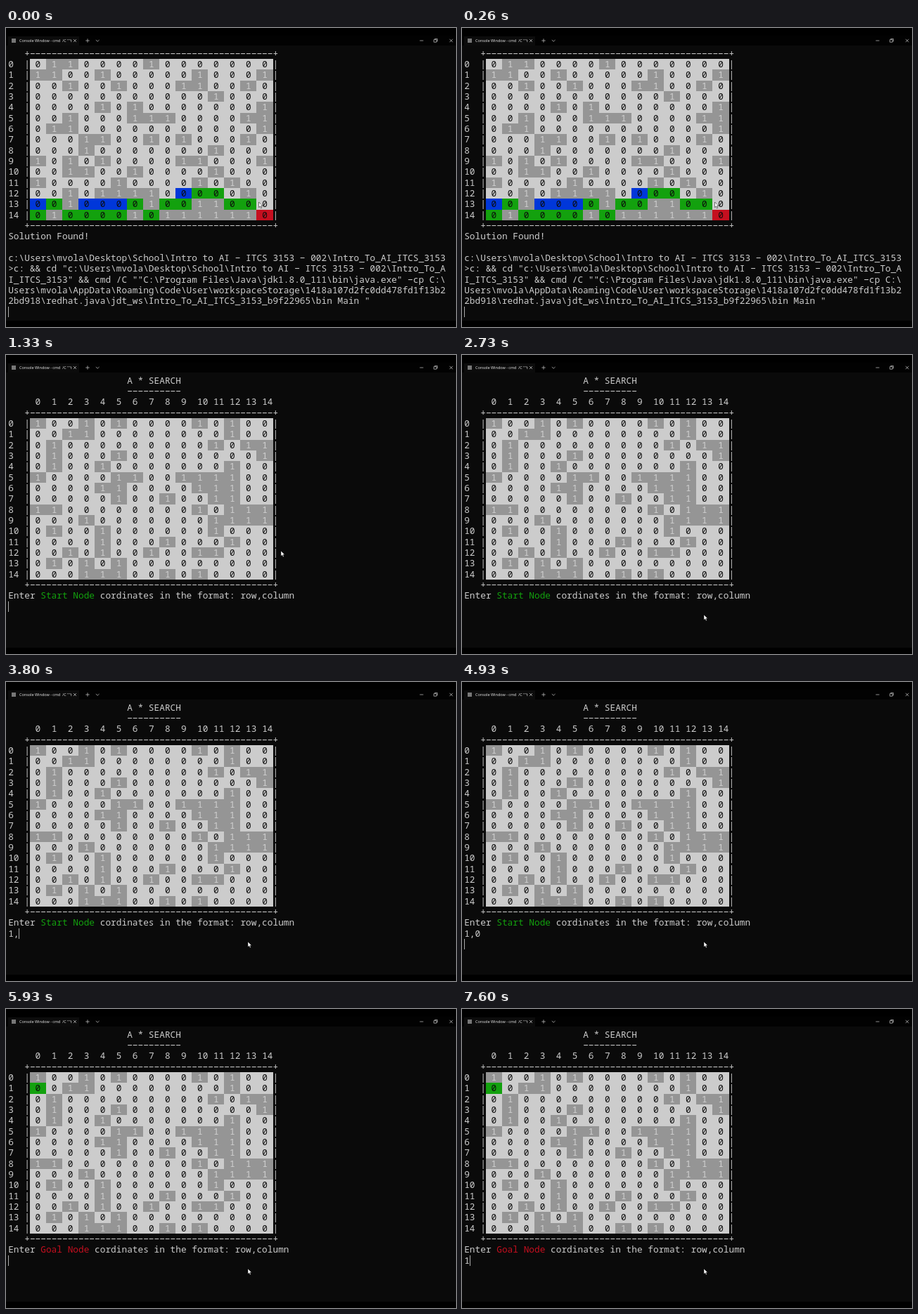
Write an HTML page that moves like this. It is 640 by 426 pixels and loops after 8 s.

```html
<!DOCTYPE html>
<html lang="en">
<head>
<meta charset="utf-8">
<title>Grid search in a terminal</title>
<style>
  html, body { margin: 0; width: 100%; height: 100%; overflow: hidden; background: #000; }
  svg { display: block; width: 640px; height: 426px; }
  text { white-space: pre; }
  .term { font: 12.8px "Noto Sans Mono", "DejaVu Sans Mono", monospace; fill: #ccc; }
  .tab { font: 5.5px "Open Sans", "Noto Sans", sans-serif; fill: #eee; }
  .icons { fill: none; stroke: #ccc; stroke-width: .7; }
</style>
</head>
<body>
<svg id="stage" viewBox="0 0 640 426" xmlns="http://www.w3.org/2000/svg">
  <rect width="640" height="426" fill="#000"/>
  <rect y="11" width="640" height="406" fill="#0a0a0a"/>
  <rect y="11" width="640" height="14" fill="#020202"/>
  <rect x="3" y="12" width="101" height="13" fill="#0c0c0c"/>
  <rect x="8" y="15" width="6" height="6" fill="#777"/>
  <text class="tab" x="19" y="20">Console Window - cmd  /C ""t</text>
  <g class="icons">
    <path d="M96 16l4 4m0-4l-4 4"/>
    <path d="M113.3 18h5.4M116 15.3v5.4"/>
    <path d="M127.8 17l2.4 2.2 2.4-2.2"/>
    <path d="M588.5 18h5"/>
    <path d="M608.6 16.6h3.6v3.6h-3.6zM609.8 16.4v-1h3.6v3.6h-1"/>
    <path d="M631 15.8l4.4 4.4m0-4.4l-4.4 4.4"/>
  </g>
  <g id="term" class="term"></g>
  <rect id="caret" width="1" height="15" fill="#aaa"/>
  <path id="mouse" d="M0 0V7.6L1.8 6 3 8.8 4.3 8.2 3.1 5.5H5.5Z" fill="#fff" stroke="#000" stroke-width=".5"/>
</svg>
<script>
const NS = 'http://www.w3.org/2000/svg';
const LOOP = 8000, SIZE = 15;
const CHAR = 7.68, LINE = 15.33, LEFT = 3.2, TOP = 28.7;
const GREEN = '#13a10e', RED = '#c50f1f', BLUE = '#0037da', INK = '#0c0c0c';
const $ = id => document.getElementById(id);
const colX = c => LEFT + c * CHAR;
const rowY = r => TOP + r * LINE;

function add(parent, tag, attrs = {}, text = '') {
  const el = document.createElementNS(NS, tag);
  for (const k in attrs) el.setAttribute(k, attrs[k]);
  el.textContent = text;
  return parent.appendChild(el);
}

// The terminal face draws its hyphens wide, like a minus sign.
const wide = s => s.replace(/-/g, '\u2212');

function print(parent, col, row, text, fill = '#ccc') {
  return add(parent, 'text', { x: colX(col), y: rowY(row) + 12.05, fill }, wide(text));
}

function block(parent, row, col, h, w, fill) {
  const x = Math.round(colX(4 + col * 3)), y = Math.round(rowY(row));
  const right = Math.round(colX(4 + (col + w) * 3)), bottom = Math.round(rowY(row + h));
  add(parent, 'rect', { x, y, width: right - x, height: bottom - y, fill });
}

// Each word lists the wall columns of one row, in base 16; marks colour single cells.
function board(parent, top, walls, marks = {}) {
  const edge = '+' + '-'.repeat(SIZE * 3) + '+';
  print(parent, 3, top, edge);
  block(parent, top + 1, 0, SIZE, SIZE, '#ccc');
  walls.split(' ').forEach((word, r) => {
    const row = top + 1 + r;
    print(parent, 0, row, String(r));
    print(parent, 3, row, '|');
    print(parent, 4 + SIZE * 3, row, '|');
    for (let c = 0; c < SIZE; c++) {
      const key = c.toString(16), wall = word.includes(key);
      const mark = marks[r + key];
      if (wall || mark) block(parent, row, c, 1, 1, mark || '#959595');
      print(parent, 5 + c * 3, row, wall ? '1' : '0', wall ? '#d0d0d0' : INK);
    }
  });
  print(parent, 3, top + SIZE + 1, edge);
}

function paint(marks, row, cols, fill) {
  for (const c of cols) marks[row + c] = fill;
}

function solvedScreen() {
  const g = add($('term'), 'g'), marks = {};
  paint(marks, 12, '9', BLUE);
  paint(marks, 12, 'ab', GREEN);
  paint(marks, 13, '0345', BLUE);
  paint(marks, 13, '1689cd', GREEN);
  paint(marks, 14, '023457', GREEN);
  paint(marks, 14, 'e', RED);
  board(g, 0, '127 014ae 259ad b 46e 2678de 12e 3479d 3b 0249ae 236b 05ac 24567d 27ab 1689abcd', marks);
  print(g, 0, 17, 'Solution Found!');
  [
    'c:\\Users\\mvola\\Desktop\\School\\Intro to AI - ITCS 3153 - 002\\Intro_To_AI_ITCS_3153',
    '>c: && cd "c:\\Users\\mvola\\Desktop\\School\\Intro to AI - ITCS 3153 - 002\\Intro_To_A',
    'I_ITCS_3153" && cmd /C ""C:\\Program Files\\Java\\jdk1.8.0_111\\bin\\java.exe" -cp C:\\',
    'Users\\mvola\\AppData\\Roaming\\Code\\User\\workspaceStorage\\1418a107d2fc0dd478fd1f13b2',
    '2bd918\\redhat.java\\jdt_ws\\Intro_To_AI_ITCS_3153_b9f22965\\bin Main "'
  ].forEach((s, i) => print(g, 0, 19 + i, s));
  return g;
}

function promptScreen(node, color, marks) {
  const g = add($('term'), 'g');
  print(g, 22, 0, 'A * SEARCH');
  print(g, 22, 1, '-'.repeat(10));
  for (let c = 0; c < SIZE; c++) print(g, 5 + c * 3, 2, String(c));
  board(g, 3, '035ac 23c 1bde 15e 14c 0569abc 45abc 58bc 01acde 3bcde 14b 48c 247ab 135 3458a', marks);
  print(g, 0, 20, 'Enter ');
  print(g, 6, 20, node, color);
  print(g, 6 + node.length, 20, ' cordinates in the format: row,column');
  return g;
}

const screens = [
  solvedScreen(),
  promptScreen('Start Node', GREEN),
  promptScreen('Goal Node', RED, { '10': GREEN })
];
const typed = print($('term'), 0, 21, '');

// Timelines: [start in ms, value...]; each value holds until the next.
const SCREEN = [[0, 0], [330, 1], [5200, 2]];
const INPUT = [[0, ''], [3530, '1'], [3800, '1,'], [4330, '1,0'], [5200, ''], [7600, '1']];
const CARET = [
  [0, 0, 24], [330], [800, 0, 21], [1600], [1860, 0, 21], [2460], [3260, 0, 21],
  [3530, 1, 21], [3800, 2, 21], [4330, 3, 21], [4860, 0, 22], [5200],
  [5930, 0, 21], [6460], [7060, 0, 21], [7600, 1, 21]
];
const MOUSE = [
  [0, 359.5, 248], [330, 450, 98], [400, 449, 140], [460, 447, 190], [530, 443, 235],
  [600, 439, 269], [800, 397, 281], [1060, 394, 279], [1330, 391, 279],
  [1600, 368, 305], [1860, 344, 363], [2200, 344, 370]
];
const at = (line, t) => line.filter(k => k[0] <= t).pop();

function draw(t) {
  const shown = at(SCREEN, t)[1];
  screens.forEach((g, i) => g.setAttribute('display', i === shown ? 'inline' : 'none'));
  typed.textContent = at(INPUT, t)[1];

  const [, col, row] = at(CARET, t);
  const on = row !== undefined;
  $('caret').setAttribute('display', on ? 'inline' : 'none');
  if (on) {
    $('caret').setAttribute('x', Math.floor(colX(col) + .2));
    $('caret').setAttribute('y', Math.round(rowY(row)));
  }

  const [, x, y] = at(MOUSE, t);
  $('mouse').setAttribute('transform', `translate(${x} ${y})`);
}

const start = performance.now();
function tick() {
  draw((performance.now() - start) % LOOP);
  requestAnimationFrame(tick);
}
tick();
</script>
</body>
</html>
```
